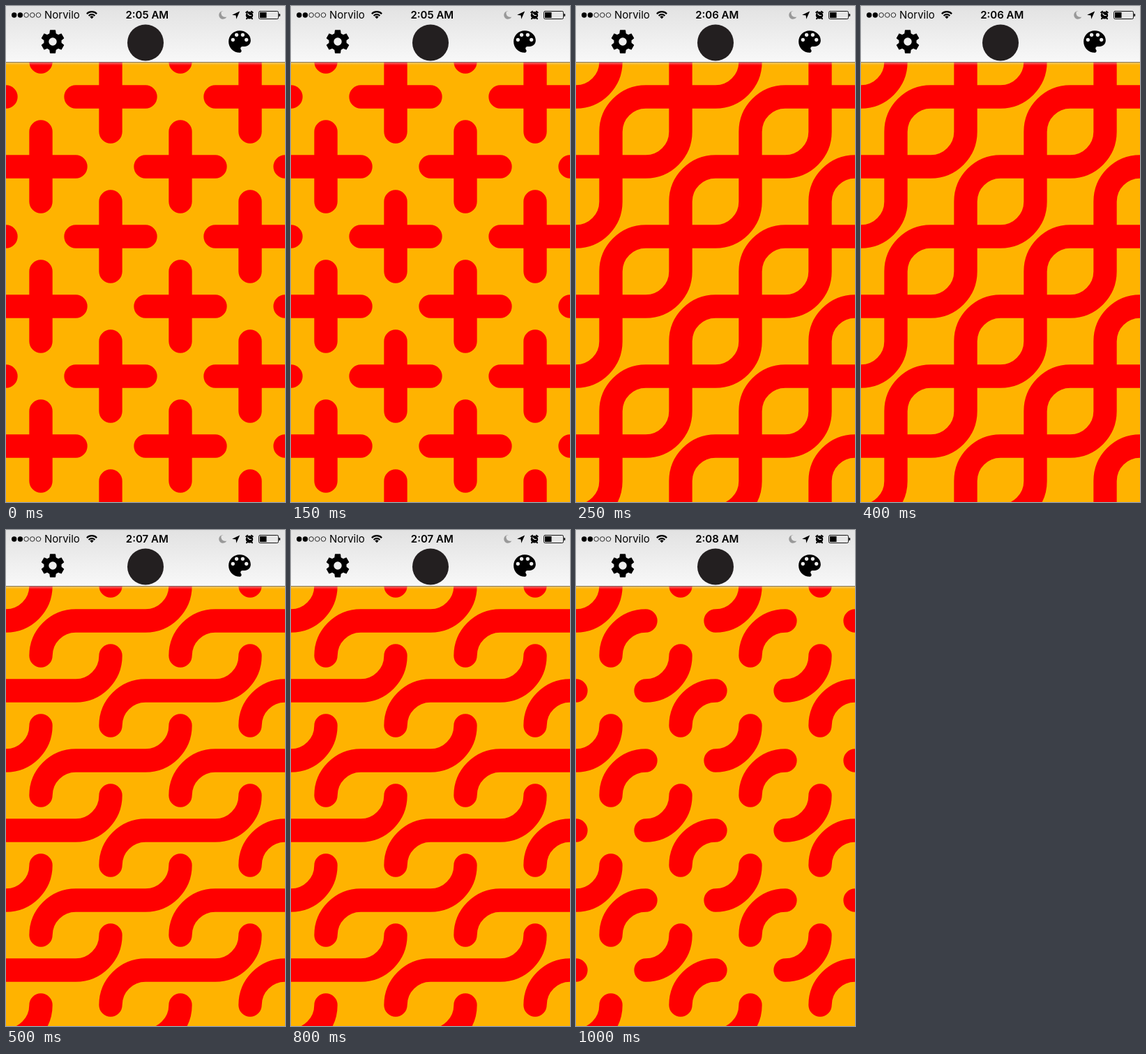
Recreate the animation shown at these times as an HTML page with a canvas. Size 400x710 px, loop 1.25 s.

```html
<!DOCTYPE html>
<html lang="en">
<head>
<meta charset="utf-8">
<title>Tile pattern</title>
<style>
  html, body { margin: 0; width: 100%; height: 100%; overflow: hidden; background: #ffb300; }
  canvas { display: block; width: 400px; height: 710px; }
</style>
</head>
<body>
<canvas id="stage"></canvas>
<script>
const W = 400, H = 710, BAR = 80, TILE = 100, LOOP = 1250;
const RED = '#ff0000', GOLD = '#ffb300', INK = '#000000';
const canvas = document.getElementById('stage');
const ctx = canvas.getContext('2d');
const dpr = window.devicePixelRatio || 1;
canvas.width = W * dpr;
canvas.height = H * dpr;

// Which strokes the alternating tiles carry, and the clock, from each start time.
const steps = [
  { at: 0, clock: '2:05 AM', across: true, down: true, arcs: false },
  { at: 250, clock: '2:06 AM', across: true, down: true, arcs: true },
  { at: 500, clock: '2:07 AM', across: true, down: false, arcs: true },
  { at: 1000, clock: '2:08 AM', across: false, down: false, arcs: true }
];

function disc(x, y, r, color) {
  ctx.beginPath();
  ctx.arc(x, y, r, 0, Math.PI * 2);
  ctx.fillStyle = color;
  ctx.fill();
}

function poly(points) {
  ctx.beginPath();
  points.forEach(([x, y]) => ctx.lineTo(x, y));
  ctx.closePath();
}

function at(x, y, scale, draw) {
  ctx.save();
  ctx.translate(x, y);
  ctx.scale(scale, scale);
  draw();
  ctx.restore();
}

function line(x1, y1, x2, y2) {
  ctx.moveTo(x1, y1);
  ctx.lineTo(x2, y2);
}

function drawPattern(step) {
  const half = TILE / 2;
  ctx.fillStyle = GOLD;
  ctx.fillRect(0, 0, W, H);
  ctx.strokeStyle = RED;
  ctx.lineWidth = TILE / 3;
  ctx.lineCap = 'round';
  ctx.beginPath();
  for (let row = -1; row < 7; row++) {
    for (let col = -1; col < 5; col++) {
      const x = col * TILE, y = BAR + row * TILE;
      if ((row + col) % 2) {
        if (step.across) line(x, y + half, x + TILE, y + half);
        if (step.down) line(x + half, y, x + half, y + TILE);
      } else if (step.arcs) {
        ctx.moveTo(x + half, y);
        ctx.arc(x, y, half, 0, Math.PI / 2);
        ctx.moveTo(x + half, y + TILE);
        ctx.arc(x + TILE, y + TILE, half, Math.PI, Math.PI * 1.5);
      }
    }
  }
  ctx.stroke();
}

function drawBar() {
  const fill = ctx.createLinearGradient(0, 0, 0, BAR);
  fill.addColorStop(0, '#e2e2e2');
  fill.addColorStop(1, '#f8f8f8');
  ctx.fillStyle = fill;
  ctx.fillRect(0, 0, W, BAR);

  const glow = ctx.createLinearGradient(0, BAR, 0, BAR + 5);
  glow.addColorStop(0, 'rgba(225,225,225,0.55)');
  glow.addColorStop(1, 'rgba(225,225,225,0)');
  ctx.fillStyle = glow;
  ctx.fillRect(0, BAR, W, 5);
  ctx.fillStyle = 'rgba(70,70,70,0.6)';
  ctx.fillRect(0, BAR, W, 1);
}

function drawSignal() {
  for (let i = 0; i < 5; i++) {
    const x = 11.7 + i * 8.7;
    if (i < 2) {
      disc(x, 13, 3.7, INK);
    } else {
      ctx.beginPath();
      ctx.arc(x, 13, 3.3, 0, Math.PI * 2);
      ctx.strokeStyle = INK;
      ctx.lineWidth = 0.8;
      ctx.stroke();
    }
  }
}

function drawWifi() {
  const from = -Math.PI * 0.75, to = -Math.PI * 0.25;
  ctx.lineCap = 'butt';
  ctx.strokeStyle = INK;
  [[1.9, 3.8], [6.2, 2.2], [10.1, 2.2]].forEach(([r, w]) => {
    ctx.beginPath();
    ctx.arc(123, 18.3, r, from, to);
    ctx.lineWidth = w;
    ctx.stroke();
  });
}

function drawMoon() {
  ctx.beginPath();
  ctx.arc(311, 13, 5.8, -Math.PI * 0.62, Math.PI * 0.12);
  ctx.arc(311, 13, 5.8, Math.PI * 0.12, Math.PI * 1.38);
  ctx.quadraticCurveTo(307, 16.5, 316.5, 15.2);
  ctx.fillStyle = '#999999';
  ctx.save();
  ctx.clip();
  ctx.beginPath();
  ctx.rect(303, 5, 16, 16);
  ctx.arc(314, 10.5, 5.3, 0, Math.PI * 2);
  ctx.fill('evenodd');
  ctx.restore();
}

function drawArrow() {
  poly([[335.2, 7.6], [324.2, 12.8], [329.6, 13.4], [330.2, 18.8]]);
  ctx.fillStyle = INK;
  ctx.fill();
}

function drawAlarm() {
  disc(349, 13.3, 5.2, INK);
  ctx.strokeStyle = INK;
  ctx.lineCap = 'round';
  ctx.lineWidth = 2;
  ctx.beginPath();
  line(344.2, 9.2, 346.2, 7.8);
  line(351.8, 7.8, 353.8, 9.2);
  line(345.6, 17.6, 345, 18.2);
  line(352.4, 17.6, 353, 18.2);
  ctx.stroke();
  ctx.strokeStyle = '#eeeeee';
  ctx.lineWidth = 1.1;
  ctx.beginPath();
  ctx.moveTo(346.5, 11);
  ctx.lineTo(349, 13.5);
  ctx.lineTo(351.5, 13.5);
  ctx.stroke();
}

function drawBattery() {
  ctx.strokeStyle = INK;
  ctx.lineWidth = 0.9;
  ctx.beginPath();
  ctx.roundRect(362.5, 7.5, 28, 11, 1.8);
  ctx.stroke();
  ctx.fillStyle = INK;
  ctx.fillRect(364, 9, 9.5, 8);
  ctx.beginPath();
  ctx.roundRect(391.4, 11, 1.7, 4, [0, 1.2, 1.2, 0]);
  ctx.fill();
}

function drawGear() {
  ctx.strokeStyle = ctx.fillStyle = INK;
  ctx.lineWidth = 4.1;
  ctx.beginPath();
  ctx.arc(0, 0, 5.45, 0, Math.PI * 2);
  ctx.stroke();
  ctx.lineWidth = 0.8;
  ctx.lineJoin = 'round';
  for (let i = 0; i < 6; i++) {
    poly([[-2.5, -6], [-2.05, -9.5], [2.05, -9.5], [2.5, -6]]);
    ctx.fill();
    ctx.stroke();
    ctx.rotate(Math.PI / 3);
  }
}

function drawPalette() {
  ctx.beginPath();
  ctx.moveTo(0, -9);
  ctx.arc(0, 0, 9, -Math.PI / 2, Math.PI / 2, true);
  ctx.bezierCurveTo(0.8, 9, 1.5, 8.3, 1.5, 7.5);
  ctx.bezierCurveTo(1.5, 6.6, 0.7, 6.4, 0.7, 5.5);
  ctx.bezierCurveTo(0.7, 4.7, 1.4, 4, 2.2, 4);
  ctx.lineTo(4, 4);
  ctx.bezierCurveTo(6.8, 4, 9, 1.8, 9, -1);
  ctx.bezierCurveTo(9, -5.4, 5, -9, 0, -9);
  [[-5.5, -1.5], [-2.5, -5.5], [2.5, -5.5], [5.5, -1.5]].forEach(([x, y]) => {
    ctx.moveTo(x + 1.5, y);
    ctx.arc(x, y, 1.5, 0, Math.PI * 2);
  });
  ctx.fillStyle = INK;
  ctx.fill('evenodd');
}

function label(text, x, weight, align) {
  ctx.font = weight + ' 15px Inter, sans-serif';
  ctx.textAlign = align;
  ctx.textBaseline = 'alphabetic';
  ctx.fillStyle = INK;
  ctx.fillText(text, x, 18.3);
}

function draw(time) {
  const t = time % LOOP;
  const step = steps.filter(s => s.at <= t).pop();
  ctx.setTransform(dpr, 0, 0, dpr, 0, 0);
  drawPattern(step);
  drawBar();
  drawSignal();
  label('Norvilo', 55, 400, 'left');
  drawWifi();
  label(step.clock, 202.3, 600, 'center');
  drawMoon();
  drawArrow();
  drawAlarm();
  drawBattery();
  at(67, 51, 1.68, drawGear);
  disc(200, 52.5, 26, '#231f20');
  at(335, 51, 1.76, drawPalette);
}

const start = performance.now();
function tick() {
  draw(performance.now() - start);
  requestAnimationFrame(tick);
}
tick();
</script>
</body>
</html>
```
